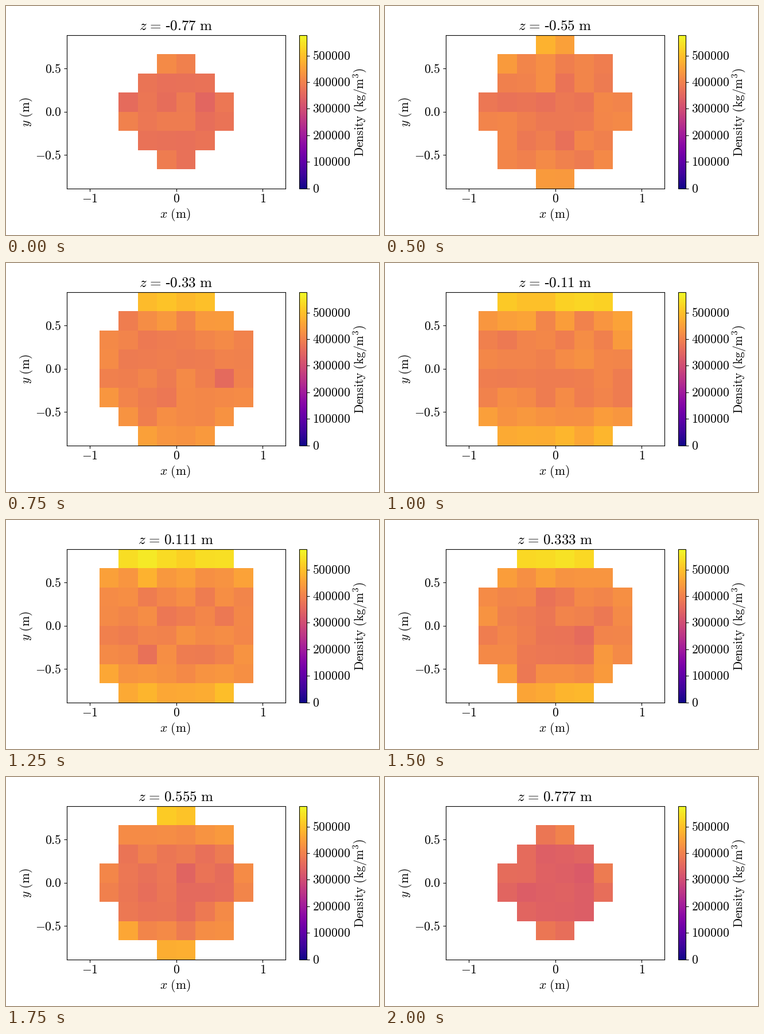
Animation, 650 px wide and 400 px high, one loop 2.5 s. Source, as a matplotlib script:

```python
import numpy as np
import matplotlib.pyplot as plt
from matplotlib.animation import FuncAnimation
from matplotlib.cm import ScalarMappable
from matplotlib.colors import Normalize

W, H, DPI = 650, 400, 100
plt.rcParams.update({
    "font.family": "Liberation Serif",
    "mathtext.fontset": "cm",
    "font.size": 15.6,
})

N = 8
CELL = 2 / 9
EDGE = CELL * N / 2
mids = (np.arange(N) - (N - 1) / 2) * CELL
x, y = np.meshgrid(mids, mids[::-1])
rng = np.random.default_rng(4)


def density(z):
    """A core that thins upwards and a rim that gets denser, plus cell noise."""
    up = max(z, 0) ** 2
    core = 392 - 110 * up - 25 * min(z, 0) ** 2
    sides = (30 + 150 * up) * x ** 2
    ends = (215 + 190 * z) * abs(y) ** 3 + 90 * y ** 5
    noise = rng.normal(0, 14, x.shape)
    outside = x ** 2 + y ** 2 + z ** 2 > 0.97
    return np.ma.masked_where(outside, 1000 * (core + sides + ends + noise))


def heading(z):
    # cut, not rounded: five characters, the sign included
    digits = f"{abs(z):.6f}"[:4 if z < 0 else 5]
    sign = "\u2010" if z < 0 else ""
    return (r"$z\hspace{0.12}=\hspace{0.12}$" + sign
            + rf"${digits}\ \mathrm{{m}}$")


slices = [density(z) for z in mids]

fig = plt.figure(figsize=(W / DPI, H / DPI), dpi=DPI, facecolor="white")


def px_axes(x0, y0, x1, y1):
    return fig.add_axes([x0 / W, 1 - y1 / H, (x1 - x0) / W, (y1 - y0) / H])


def px_text(px, py, s, **kw):
    return fig.text(px / W, 1 - py / H, s, ha="center", va="baseline",
                    rotation_mode="anchor", **kw)


ax = px_axes(106.4, 50.8, 487, 318.8)
norm = Normalize(0, 577000)
im = ax.imshow(slices[0], cmap="plasma", norm=norm, aspect="auto",
               interpolation="nearest", extent=(-EDGE, EDGE, -EDGE, EDGE))
ax.set_xlim(-1.263, 1.263)
ax.set_ylim(-EDGE, EDGE)
ax.set_xticks([-1, 0, 1], ["$-1$", "$0$", "$1$"])
ax.set_yticks([-0.5, 0, 0.5], ["$-0.5$", "$0.0$", "$0.5$"])

cax = px_axes(511.4, 50.8, 524.4, 318.8)
bar = fig.colorbar(ScalarMappable(norm, "plasma"), cax=cax)
steps = range(0, 600000, 100000)
bar.set_ticks(steps, labels=[f"${v}$" for v in steps])

px_text(294.8, 370, r"$x\ \mathrm{(m)}$")
px_text(41, 185.5, r"$y\ \mathrm{(m)}$", rotation=90)
px_text(624, 185.5, r"$\mathrm{Density\ (kg/m^3)}$", rotation=90, fontsize=15.4)
title = px_text(296.5, 42, "", fontsize=18.1)


def draw(i):
    k = min(max(i - 1, 0), N - 1)   # first and last slice stay twice as long
    im.set_data(slices[k])
    title.set_text(heading(mids[k]))
    return im, title


anim = FuncAnimation(fig, draw, frames=N + 2, interval=250, repeat=True,
                     init_func=lambda: draw(0))
plt.show()
```
